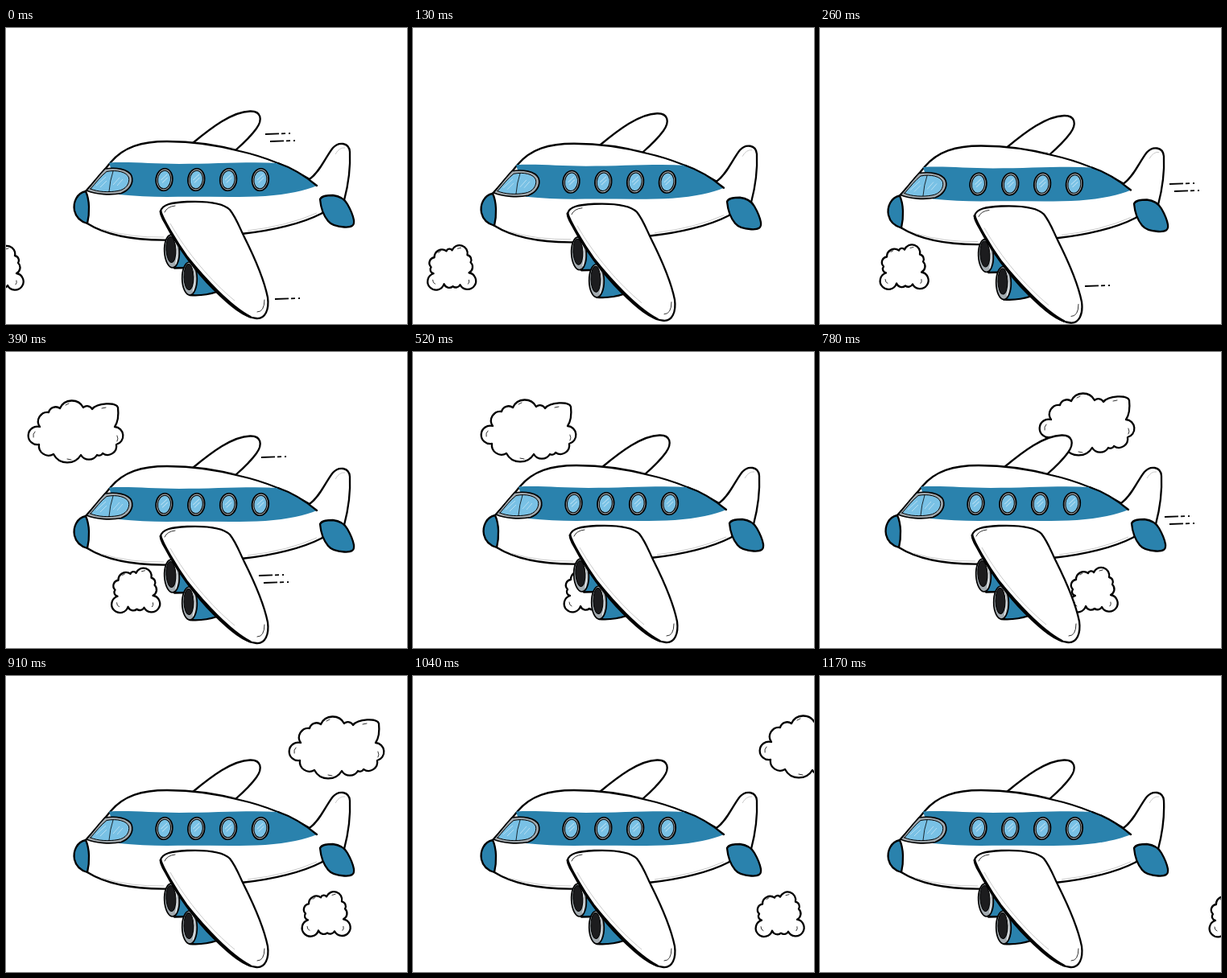
Recreate the animation shown at these times as an HTML page. Size 498 by 368 pixels, loop 1300 ms.

```html
<!DOCTYPE html>
<html lang="en">
<head>
<meta charset="utf-8">
<title>Airplane</title>
<style>
  html, body { margin: 0; width: 100%; height: 100%; overflow: hidden; background: #fff; }
  svg { display: block; width: 498px; height: 368px; }
  .ink { stroke: #000; stroke-width: 2.3; stroke-linejoin: round; stroke-linecap: round; }
  .white { fill: #fff; }
  .blue { fill: #2a82ad; }
  .frame { fill: #a3abb0; stroke-width: 1.7; }
  .glass { fill: #79c1e5; stroke-width: 1; }
  .thin { fill: none; stroke-width: .8; }
  .shine { fill: none; stroke: #b5def2; stroke-width: 1; }
  .shade { fill: none; stroke: #bbb; stroke-width: .8; }
  .streak { fill: none; stroke-width: 1.8; stroke-linecap: butt; stroke-dasharray: 17 3 5 4 2 99; }
</style>
</head>
<body>
<svg viewBox="0 0 498 368">
  <defs>
    <g id="window">
      <ellipse class="ink frame" rx="10.3" ry="13.8"/>
      <ellipse class="ink glass" rx="8" ry="11.4"/>
      <path class="shine" d="M-4 1L3 -7M-2 4L4 -3"/>
    </g>
    <g id="engine">
      <ellipse class="ink frame" rx="9.3" ry="20.5"/>
      <path class="shine" style="stroke:#fff" d="M3 -16Q9 0 4 16"/>
      <ellipse cx="-1" cy="-2" rx="6" ry="16" fill="#1c1c1e" stroke="#000"/>
    </g>
  </defs>

  <g id="streaks"></g>

  <g id="bigCloud">
    <path class="ink white" d="M42 93A11.500 11.500 0 0 1 53 75A9 9 0 0 1 67 70A16.200 16.200 0 0 1 96 69A7 7 0 0 1 107 71C113 63 137 62 139 69C140 78 139 87 135 93A11.200 11.200 0 0 1 137 115A11 11 0 0 1 120 126A5 5 0 0 1 113 128A11.600 11.600 0 0 1 93 128A19.500 19.500 0 0 1 59 127A12 12 0 0 1 41 115A11.300 11.300 0 1 1 42 93Z"/>
    <path class="ink thin" d="M36 99Q33 102 34 106M43 80l3 -3M74 66l4 -2M119 70l5 -1M138 104q2 4 0 7M76 133l5 1"/>
  </g>

  <g id="smallCloud">
    <path class="ink white" d="M137 283A9.500 9.500 0 0 1 152 275A4 4 0 0 1 159 274A10 10 0 0 1 178 280A6 6 0 0 1 182 289A8 8 0 0 1 180 302A10.400 10.400 0 1 1 169 317A6 6 0 0 1 160 319A7 7 0 0 1 149 316A10.400 10.400 0 1 1 136 303A5 5 0 0 1 133 295A7 7 0 0 1 137 283Z"/>
    <path class="ink thin" d="M142 277l3 -2M166 272l4 -1M180 311q1 3 -1 5M135 311q0 4 3 5"/>
  </g>

  <g id="plane">
    <path class="ink white" d="M232 143C255 124 281 104 303 103.500C317 103 319 114 311 125C303 136 293 145 285 152Z"/>
    <path class="shade" d="M250 146Q267 149 283 149"/>

    <path class="ink white" d="M98 204C110 191 121 178 130 167C146 148 168 141 200 141C236 141 268 147 290 153C326 161 352 173 377 188C390 179 397 160 406 149C413 141 426 142 427 154C428 175 425 195 420 214L400 226L391 231C368 243 330 252 296 255.500L200 263.500C160 264 125 258 101 243Z"/>
    <path class="blue" d="M128 167.500C155 166 180 169 215 169C260 169 300 166 338 168C355 174 370 184 386 196C372 202 350 207 322 209C285 211 240 209 200 210C180 210 160 209 140 207Z"/>
    <path class="ink" fill="none" d="M338 168C353 173 369 182 386 196"/>
    <path class="shade" d="M118 250Q155 261 196 260M300 252Q350 246 386 230M409 157Q414 148 421 149"/>
    <path class="ink blue" d="M99 203C88 205 83 217 85 227C87 236 94 241 101 243C104 230 104 214 99 203Z"/>

    <path class="ink frame" d="M100 202C107 194 116 182 123 175C136 173 152 175 156 184C159 193 153 202 143 205.500C130 208 112 207 100 202Z"/>
    <path class="ink glass" d="M105 200C112 192 118 184 125 178.500C138 176 150 179 152.500 186C154 193 149 201 139 202.500C128 204.500 114 204 105 200Z"/>
    <path class="ink thin" d="M133 178Q129 190 128 203"/>
    <path class="shine" d="M112 196L124 185M117 198L125 190M133 195L141 186M138 196L145 188"/>
    <g id="windows"></g>

    <path class="ink blue" d="M390 213C392 208 400 208 406 208C415 209 420 212 424 219C428 226 431 233 432 239C433 246 429 248 420 247.500C411 247 404 245 400 240C395 234 391 224 390 213Z"/>

    <path class="ink blue" d="M206 257L229 285L228 298L209 298.500Z"/>
    <use href="#engine" transform="translate(206 277.500) rotate(-3)"/>
    <path class="ink blue" d="M229 291L262 328C250 332 240 333 228 332Z"/>
    <use href="#engine" transform="translate(228 311.500) rotate(-1)"/>

    <path class="ink white" d="M192 228C194 219 206 217 225 216C250 215 270 218 278 226C286 236 290 248 296 260C308 284 320 310 325 335C327 350 322 362 311 361C296 360 278 345 258 325C235 302 212 270 199 245C195 238 191 232 192 228Z"/>
    <path class="ink" fill="none" style="stroke-width:3" d="M192 228C194 236 210 264 225 285C245 310 278 346 303 359"/>
    <path class="ink thin" d="M197 229Q200 222 210 221M312 353Q321 353 321 338"/>
    <path class="shade" d="M204 243C225 280 255 315 284 339"/>
  </g>
</svg>
<script>
const STEP = 130, STEPS = 10;

// Key points: [step, x, y]
const smallKeys = [[0, -9, 3], [4, 217, 0], [6, 339, 0], [9, 513, 1]];
const bigKeys = [[3, 27, 60], [4, 84, 59], [6, 272, 51], [8, 430, 49]];
const dipKeys = [[0, 0, 0], [2, 0, 5.5], [3, 0, 1], [9, 0, 1]];

const puffs = [
  { step: 0, x: 322, y: 132, lines: 2 },
  { step: 0, x: 334, y: 337, lines: 1 },
  { step: 2, x: 434, y: 194, lines: 2 },
  { step: 2, x: 329, y: 321, lines: 1 },
  { step: 3, x: 317, y: 131, lines: 1 },
  { step: 3, x: 314, y: 278, lines: 2 },
  { step: 6, x: 428, y: 205, lines: 2 }
];

const el = id => document.getElementById(id);

function along(keys, step) {
  const next = Math.max(1, keys.findIndex(key => key[0] >= step));
  const [t0, x0, y0] = keys[next - 1], [t1, x1, y1] = keys[next];
  const k = (step - t0) / (t1 - t0);
  return [x0 + (x1 - x0) * k, y0 + (y1 - y0) * k];
}

function move(id, x, y) {
  el(id).setAttribute("transform", `translate(${x} ${y})`);
}

function puff({ x, y, lines }) {
  return Array.from({ length: lines }, (_, i) =>
    `<path class="ink streak" d="M${x + 6 * i} ${y + 9 * i}l31 -1"/>`).join("");
}

function draw(time) {
  const step = Math.floor(time / STEP) % STEPS;

  const sway = step > 3 && step < 7 ? Math.sin((step - 3) * Math.PI / 2) : 0;
  move("plane", 3 * sway, along(dipKeys, step)[1] - Math.abs(sway));

  const [smallX, smallY] = along(smallKeys, step);
  move("smallCloud", smallX - 158, smallY);

  const bigVisible = step >= 3 && step <= 8;
  el("bigCloud").style.display = bigVisible ? "" : "none";
  if (bigVisible) {
    const [bigX, bigY] = along(bigKeys, step);
    move("bigCloud", bigX - 27, bigY - 60);
  }

  el("streaks").innerHTML = puffs.filter(p => p.step === step).map(puff).join("");
}

for (let i = 0; i < 4; i++) {
  el("windows").innerHTML +=
    `<use href="#window" transform="translate(${196.5 + 39.8 * i} 188.5) rotate(6)"/>`;
}

const start = performance.now();
function tick() {
  draw(performance.now() - start);
  requestAnimationFrame(tick);
}
tick();
</script>
</body>
</html>
```
